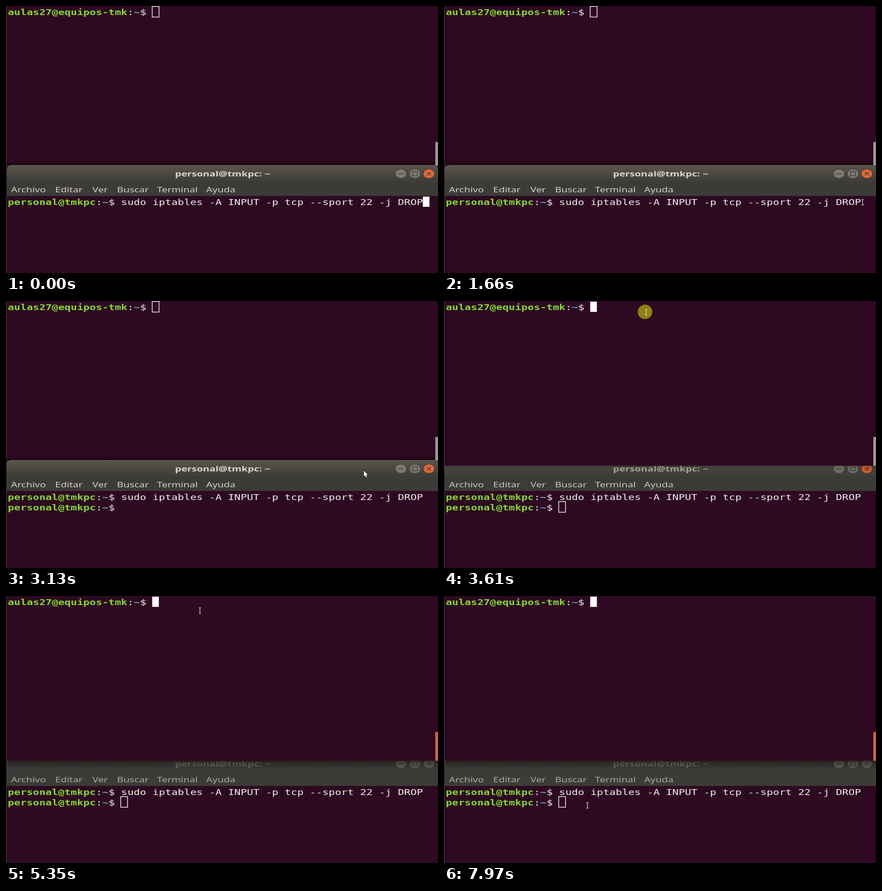
Animation of 950x589 px, one loop 8000 ms. Source, as an HTML page with a canvas:

```html
<!DOCTYPE html>
<html lang="es">
<head>
<meta charset="utf-8">
<title>Terminal</title>
<style>
html, body { margin: 0; width: 950px; height: 589px; overflow: hidden; background: #2d0a21; }
canvas { display: block; }
</style>
</head>
<body>
<canvas id="stage" width="950" height="589"></canvas>
<script>
const ctx = document.getElementById('stage').getContext('2d');
const LOOP = 8000, TICK = 69;
const CELL = 13.84, LEFT = 4;
const ASPECT = 1.306;
const MONO = '17.6px "DejaVu Sans Mono", monospace';
const SANS = '16.8px "Noto Sans", sans-serif';
const BG = '#2d0a21', BAR = '#3c3b37', WHITE = '#eeeeec';
const COMMAND = 'sudo iptables -A INPUT -p tcp --sport 22 -j DROP';
const RAISE = 3540, SETTLE = 3680;

// Bottom window colours: focused, losing focus, unfocused
const LOOKS = [
  { title: '#dad6cb', menu: '#d2cec3', button: '#7d7a72', close: '#e0683a', mark: '#383733', bar: '#5a564c' },
  { title: '#b0ada3', menu: '#cac6bb', button: '#76736b', close: '#d9602f', mark: '#383733', bar: '#55524a' },
  { title: '#6d6b64', menu: '#aaa89f', button: '#5f5d56', close: '#5f5d56', mark: '#3c3b37', bar: BAR }
];
const MENU = [['Archivo', 11], ['Editar', 108], ['Ver', 190], ['Buscar', 244], ['Terminal', 332], ['Ayuda', 440]];

// Pointer path: time, x, y
const PATH = [
  [320, 945, 578], [990, 920, 433], [2650, 920, 433], [3130, 787, 374], [3270, 600, 238],
  [3410, 486, 92], [3470, 444, 25], [4220, 444, 25], [4290, 442, 25], [4950, 442, 25],
  [5350, 426, 32], [5560, 403, 33], [7280, 380, 70], [7420, 308, 205], [7560, 249, 320],
  [7700, 219, 415], [7800, 235, 490], [7900, 282, 482], [7970, 315, 462]
];

const within = (t, spans) => spans.some(([a, b]) => t >= a && t < b);

function rect(x, y, w, h, color) {
  ctx.fillStyle = color;
  ctx.fillRect(x, y, w, h);
}

function fade(y, h, from, to) {
  const g = ctx.createLinearGradient(0, y, 0, y + h);
  g.addColorStop(0, from);
  g.addColorStop(1, to);
  return g;
}

function text(str, x, y, font, color, align = 'left') {
  ctx.save();
  ctx.translate(x, y);
  ctx.scale(ASPECT, 1);
  ctx.font = font;
  ctx.textAlign = align;
  ctx.fillStyle = color;
  ctx.fillText(str, 0, 0);
  ctx.restore();
}

function prompt(who, y, command = '') {
  let x = LEFT;
  const put = (str, color, weight = '') => {
    text(str, x, y, weight + MONO, color);
    x += str.length * CELL;
  };
  put(who, '#85d92f', 'bold ');
  put(':', WHITE);
  put('~', '#729fcf', 'bold ');
  put('$ ' + command, WHITE);
}

function cursor(col, y, hollow) {
  const x = LEFT + col * CELL - 0.8;
  if (hollow) {
    ctx.strokeStyle = WHITE;
    ctx.lineWidth = 1.6;
    ctx.strokeRect(x, y, 15, 23.4);
  } else {
    rect(x, y + 0.5, 14.6, 22.5, '#fff');
  }
}

function line(points, color, width) {
  ctx.beginPath();
  points.forEach(([x, y]) => ctx.lineTo(x, y));
  ctx.strokeStyle = color;
  ctx.lineWidth = width;
  ctx.stroke();
}

function button(x, fill, mark, kind) {
  const y = 370;
  ctx.beginPath();
  ctx.ellipse(x, y, 12.3, 10.3, 0, 0, Math.PI * 2);
  ctx.fillStyle = fill;
  ctx.fill();
  ctx.strokeStyle = '#34332f';
  ctx.lineWidth = 1;
  ctx.stroke();
  if (kind === 'min') line([[x - 6, y], [x + 6, y]], mark, 1.4);
  if (kind === 'max') {
    ctx.strokeStyle = mark;
    ctx.lineWidth = 1.4;
    ctx.strokeRect(x - 5.5, y - 4.5, 11, 9);
  }
  if (kind === 'close') {
    line([[x - 4.5, y - 3.7], [x + 4.5, y + 3.7]], mark, 1.4);
    line([[x - 4.5, y + 3.7], [x + 4.5, y - 3.7]], mark, 1.4);
  }
}

function topWindow(t, raised) {
  const bottom = raised ? 363.5 : 352;
  const settled = t >= SETTLE;
  rect(0, 0, 950, bottom, BG);
  rect(0, 0, 1.6, bottom, '#3c2f33');
  rect(944, 300, 6, bottom - 300, settled ? '#c8663f' : '#9b9792');
  prompt('aulas27@equipos-tmk', 20);
  if (!within(t, [[4220, 4950], [5560, 5760], [6820, 7280]])) cursor(23, 1, !raised);
  if (raised) {
    const shade = settled ? 0.4 : 0.15;
    rect(4, bottom, 946, 18, fade(bottom, 18, `rgba(0,0,0,${shade})`, 'rgba(0,0,0,0)'));
  } else {
    rect(2, 339, 942, 13, fade(339, 13, 'rgba(0,0,0,0)', 'rgba(0,0,0,.35)'));
  }
}

function bottomWindow(t, raised) {
  const look = LOOKS[t < RAISE ? 0 : t < SETTLE ? 1 : 2];
  ctx.beginPath();
  ctx.roundRect(1.5, 351, 948.5, 80, [9, 9, 0, 0]);
  ctx.fillStyle = fade(351, 38, look.bar, BAR);
  ctx.fill();
  if (!raised) rect(10, 351, 932, 1, '#69655b');
  text('personal@tmkpc: ~', 476.5, 376, 'bold ' + SANS, look.title, 'center');
  button(868.5, look.button, look.mark, 'min');
  button(899.3, look.button, look.mark, 'max');
  button(930, look.close, look.mark, 'close');
  MENU.forEach(([label, x]) => text(label, x, 411, '500 ' + SANS, look.menu));

  rect(0, 419, 950, 170, BG);
  rect(0, 419, 1.6, 170, '#3c2f33');
  prompt('personal@tmkpc', 439, COMMAND);
  if (t >= 2190) prompt('personal@tmkpc', 461.5);
  if (!within(t, [[1660, 2120], [2650, 3270]])) {
    if (t < 2120) cursor(66, 420, false);
    else cursor(t < 2190 ? 0 : 18, 442.5, raised);
  }
}

function pointerAt(t) {
  let i = PATH.length - 1;
  while (i > 0 && PATH[i][0] > t) i--;
  const [start, x, y] = PATH[i];
  const next = PATH[i + 1];
  if (!next) return [x, y];
  const k = Math.floor((t - start) / TICK) * TICK / (next[0] - start);
  return [x + (next[1] - x) * k, y + (next[2] - y) * k];
}

function pointer(t, raised) {
  if (!within(t, [[320, 5760], [7280, LOOP]])) return;
  const [x, y] = pointerAt(t);
  if (within(t, [[1000, 1260], [3470, SETTLE]])) {
    ctx.beginPath();
    ctx.arc(x - 2, y - 1, 16, 0, Math.PI * 2);
    ctx.fillStyle = 'rgba(245,245,8,.5)';
    ctx.fill();
  }
  if (y > (raised ? 363 : 351) && y < 419) {
    ctx.beginPath();
    [[0, 0], [0, 13], [2.8, 10.5], [5, 15.5], [7, 14.5], [5, 9.8], [8.6, 9.5]]
      .forEach(([dx, dy]) => ctx.lineTo(x + dx, y + dy));
    ctx.closePath();
    ctx.strokeStyle = '#111';
    ctx.lineWidth = 1.6;
    ctx.stroke();
    ctx.fillStyle = '#fff';
    ctx.fill();
  } else {
    const px = Math.round(x) + 0.5, py = Math.round(y);
    line([[px, py - 6], [px, py + 6]], WHITE, 1.2);
    [-6, 6].forEach(d => line([[px - 2.5, py + d], [px + 2.5, py + d]], WHITE, 1.1));
  }
}

function draw(now) {
  const t = now % LOOP;
  const raised = t >= RAISE;
  const windows = raised ? [bottomWindow, topWindow] : [topWindow, bottomWindow];
  windows.forEach(paint => paint(t, raised));
  pointer(t, raised);
  requestAnimationFrame(draw);
}
requestAnimationFrame(draw);
</script>
</body>
</html>
```
